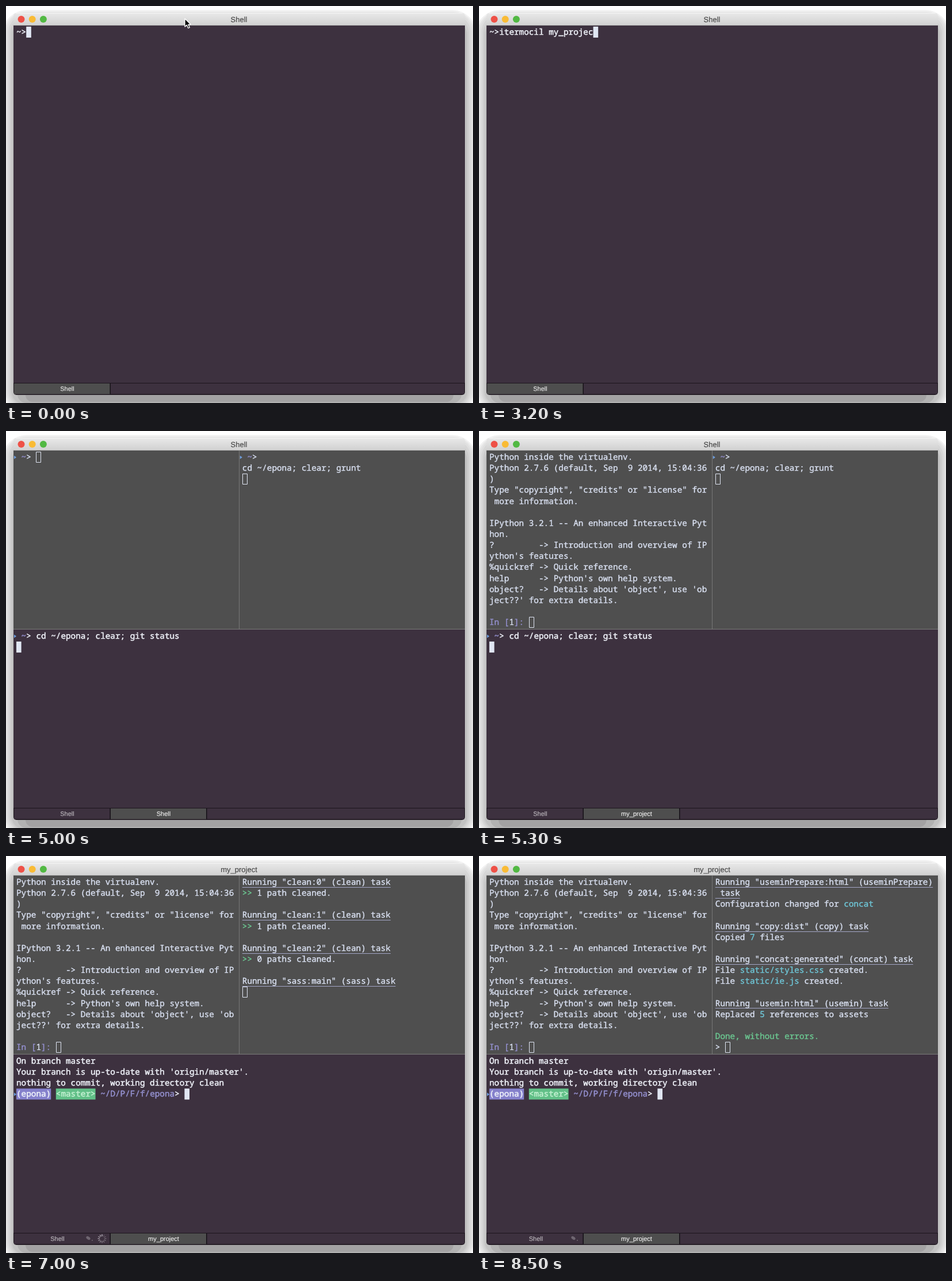
An HTML page with a canvas that plays this animation: 812x690 px, repeating every 10 s.

```html
<!DOCTYPE html>
<html lang="en">
<head>
<meta charset="utf-8">
<title>Shell</title>
<style>
  html, body { margin: 0; width: 812px; height: 690px; overflow: hidden; background: #fff; }
  canvas { display: block; }
</style>
</head>
<body>
<canvas id="stage" width="812" height="690"></canvas>
<script>
const g = document.getElementById('stage').getContext('2d');
const LOOP = 10000, CELL = 8.6, ROW = 19.13;
const DARK = '#3d313f', DIM = '#4f4f4f', LIGHT = '#e0e6f3';
const MONO = '14.33px "Noto Sans Mono", monospace';
const SANS = '"Liberation Sans", Arial, sans-serif';
const INK = { v: '#9490cf', g: '#6cc992', c: '#6fc7d8' };
const FILL = { V: '#8581cc', G: '#62c088' };

const COMMAND = 'itermocil my_project';
const KEY_TIMES = [200, 300, 400, 500, 600, 700, 800, 900, 1000, 1200, 1500, 1600,
  2200, 2600, 2700, 2800, 2900, 3000, 3200, 3300];

// Markup: {style|text}; a leading ▸ is the prompt mark in the margin.
const PROMPT = '▸ {v|~}> ';
const PYTHON = `Python inside the virtualenv.
Python 2.7.6 (default, Sep  9 2014, 15:04:36
)
Type "copyright", "credits" or "license" for
 more information.

IPython 3.2.1 -- An enhanced Interactive Pyt
hon.
?         -> Introduction and overview of IP
ython's features.
%quickref -> Quick reference.
help      -> Python's own help system.
object?   -> Details about 'object', use 'ob
ject??' for extra details.

{v|In [}1{v|]:} `;
const GIT = `On branch master
Your branch is up-to-date with 'origin/master'.
nothing to commit, working directory clean
▸{V|(epona)} {G|<master>} {v|~/D/P/F/f/epona}> `;

const task = (name, kind) => `{u|Running "${name}" (${kind}) task}\n`;
const cleaned = text => `{g|>>} ${text} cleaned.\n\n`;
const LOG = [
  [6200, task('clean:0', 'clean')],
  [6300, cleaned('1 path') + task('clean:1', 'clean') + cleaned('1 path')],
  [6400, task('clean:2', 'clean') + cleaned('0 paths')],
  [6500, task('sass:main', 'sass')],
  [7400, '\n{u|Running "useminPrepare:html" (useminPrepare)}\n{u| task}\nConfiguration changed for {c|concat}\n\n'],
  [7600, task('copy:dist', 'copy') + 'Copied {c|7} files\n\n'],
  [7800, task('concat:generated', 'concat')
    + 'File {c|static/styles.css} created.\nFile {c|static/ie.js} created.\n\n'],
  [8000, task('usemin:html', 'usemin') + 'Replaced {c|5} references to assets\n\n'],
  [8200, '{g|Done, without errors.}\n'],
  [8500, '> ']
];
const LEFT = [[0, ''], [4700, PROMPT], [5100, PYTHON]];
const RIGHT = [[0, ''], [4700, PROMPT], [4900, PROMPT + '\ncd ~/epona; clear; grunt\n'], [6000, '']];
const BOTTOM = [[0, ''], [4700, PROMPT], [4900, PROMPT + 'cd ~/epona; clear; git status\n'], [5700, GIT]];

const latest = (steps, t) => steps.filter(s => s[0] <= t).pop()[1];

function box(x, y, w, h, color) {
  g.fillStyle = color;
  g.fillRect(x, y, w, h);
}

function rounded(x, y, w, h, r, color) {
  g.fillStyle = color;
  g.beginPath();
  g.roundRect(x, y, w, h, r);
  g.fill();
}

function disc(x, y, r, color) {
  g.fillStyle = color;
  g.beginPath();
  g.arc(x, y, r, 0, 7);
  g.fill();
}

// Text with a thin outline, which gives a heavier, smoothed look.
function inked(text, x, y, color, weight) {
  g.fillStyle = g.strokeStyle = color;
  g.lineWidth = weight;
  g.lineJoin = 'round';
  g.fillText(text, x, y);
  g.strokeText(text, x, y);
}

function label(text, x, y, size, color) {
  g.font = `${size}px ${SANS}`;
  g.textAlign = 'center';
  inked(text, x, y, color, .15);
}

function path(points) {
  g.beginPath();
  points.forEach(([x, y]) => g.lineTo(x, y));
  g.closePath();
}

// Draws one marked-up line and returns the x where it ends.
function textLine(line, x, top, color, weight) {
  if (line[0] === '▸') {
    path([[x - 4, top + 7], [x, top + 10], [x - 4, top + 13]]);
    g.fillStyle = '#70a0e0';
    g.fill();
    line = line.slice(1);
  }
  line.split(/[{}]/).forEach((part, i) => {
    const style = i % 2 ? part[0] : '', text = i % 2 ? part.slice(2) : part;
    const width = text.length * CELL;
    if (FILL[style]) box(x, top, width, ROW, FILL[style]);
    if (style === 'u') box(x, Math.round(top + 18.2), width, 1, '#a3a6c6');
    inked(text, x, top + 14.3, style === 'G' ? '#c4f0d2' : INK[style] || color, weight);
    x += width;
  });
  return x;
}

function pane(text, x, y, w, h, active) {
  box(x, y, w, h, active ? DARK : DIM);
  g.font = MONO;
  g.textAlign = 'left';
  const rows = text.split('\n').slice(-Math.floor(h / ROW));
  const rowTop = i => y + 1.8 + i * ROW;
  let end;
  rows.forEach((line, i) => {
    end = textLine(line, x + 5, rowTop(i), active ? '#f0f3fa' : '#dae1f2', active ? .5 : .4);
  });
  const top = rowTop(rows.length - 1);
  if (active) return box(end, top, CELL, ROW, LIGHT);
  g.strokeStyle = LIGHT;
  g.lineWidth = 1;
  g.strokeRect(Math.round(end) + .5, Math.round(top) + .5, 8, 18);
}

function frame(title) {
  box(0, 0, 812, 690, '#fff');
  [[-6, 7, 42, '#f1f1f1'], [-2, 10, 36, '#e6e6e6'], [1, 13, 32, '#dfdfdf'], [4, 17, 28, '#d6d6d6'],
   [7, 23, 24, '#cdcdcd'], [10, 30, 20, '#c2c2c2']].forEach(([x, y, r, color], i) =>
    rounded(x, y, 812 - 2 * x, 706 - y - i * 3, r, color));
  rounded(20, 660, 772, 30, 16, '#b2b2b2');
  rounded(34, 660, 744, 28, 12, '#a3a2a3');
  const shade = g.createLinearGradient(0, 12, 0, 34);
  shade.addColorStop(0, '#e9e9e9');
  shade.addColorStop(1, '#d0d0d0');
  rounded(13, 12, 785, 30, 5, shade);
  box(17, 12, 777, 1, '#f5f5f5');
  rounded(13, 34, 785, 642, [0, 0, 5, 5], '#1c151d');
  box(13, 33, 785, 1, '#b1b1b1');
  ['#ee5147', '#f9bb35', '#52b943'].forEach((color, i) => disc(26.5 + i * 19.2, 23, 6, color));
  label(title, 405, 28, 13, '#484848');
}

function mark(x) {
  g.fillStyle = '#6f6671';
  g.beginPath();
  g.ellipse(x - 2, 664, 4, 2.5, .6, 0, 7);
  g.fill();
  disc(x + 5, 668, 1, '#6f6671');
}

function spinner(x, y, t) {
  g.lineWidth = 1.3;
  for (let i = 0; i < 12; i++) {
    const a = i * Math.PI / 6, fade = (i - Math.floor(t / 100) % 12 + 12) % 12;
    g.strokeStyle = `rgba(220,215,222,${.25 + fade * .055})`;
    g.beginPath();
    g.moveTo(x + 4 * Math.cos(a), y + 4 * Math.sin(a));
    g.lineTo(x + 7.5 * Math.cos(a), y + 7.5 * Math.sin(a));
    g.stroke();
  }
}

function tabs(t) {
  const second = t >= 3900, busy = t >= 6100 && t < 8500;
  box(14, 656, 783, 18.5, DARK);
  box(second ? 182 : 14, 656, second ? 166 : 167, 18.5, '#4e4e4e');
  box(180.5, 656, 1.5, 18.5, '#151016');
  label('Shell', busy ? 89.5 : t >= 8500 ? 99 : 106.5, 669, 11, second ? '#bcb7bd' : '#e9e9e9');
  if (second) {
    box(348, 656, 1.5, 18.5, '#151016');
    label(t < 5100 ? 'Shell' : 'my_project', 274, 669, 11, '#eee');
  }
  if (busy) spinner(167, 665, t);
  if (t >= 6100) mark(busy ? 145 : 166);
}

function pointer(x, y) {
  path([[0, 0], [0, 14], [3.3, 11], [5.8, 16.5], [8.3, 15.4], [5.8, 10.2], [10, 10]]
    .map(([dx, dy]) => [x + dx, y + dy]));
  g.lineWidth = 1.3;
  g.strokeStyle = '#fff';
  g.fillStyle = '#000';
  g.fill();
  g.stroke();
}

function draw(t) {
  frame(t < 5600 ? 'Shell' : 'my_project');
  if (t < 3900) {
    const typed = COMMAND.slice(0, KEY_TIMES.filter(k => k <= t).length);
    pane('~>' + typed + (t >= 3600 ? '\n' : ''), 13, 34, 785, 621, true);
  } else if (t < 4000) {
    pane('', 13, 34, 785, 621, true);
  } else {
    const split = t >= 4300, low = t >= 4500;
    const log = LOG.filter(s => s[0] <= t).map(s => s[1]).join('');
    pane(latest(LEFT, t), 13, 34, split ? 392 : 785, 310, !split);
    if (split) {
      pane(log || latest(RIGHT, t), 405.8, 34, 392.2, 310, !low);
      box(405, 34, 1, 310, '#777');
    }
    pane(latest(BOTTOM, t), 13, 345, 785, 310, low);
    box(13, 344, 785, 1, '#7b7b7b');
  }
  tabs(t);
  if (t < 100) pointer(311, 22);
}

const start = performance.now();
function tick() {
  draw((performance.now() - start) % LOOP);
  requestAnimationFrame(tick);
}
g.textRendering = 'geometricPrecision';
tick();
</script>
</body>
</html>
```
